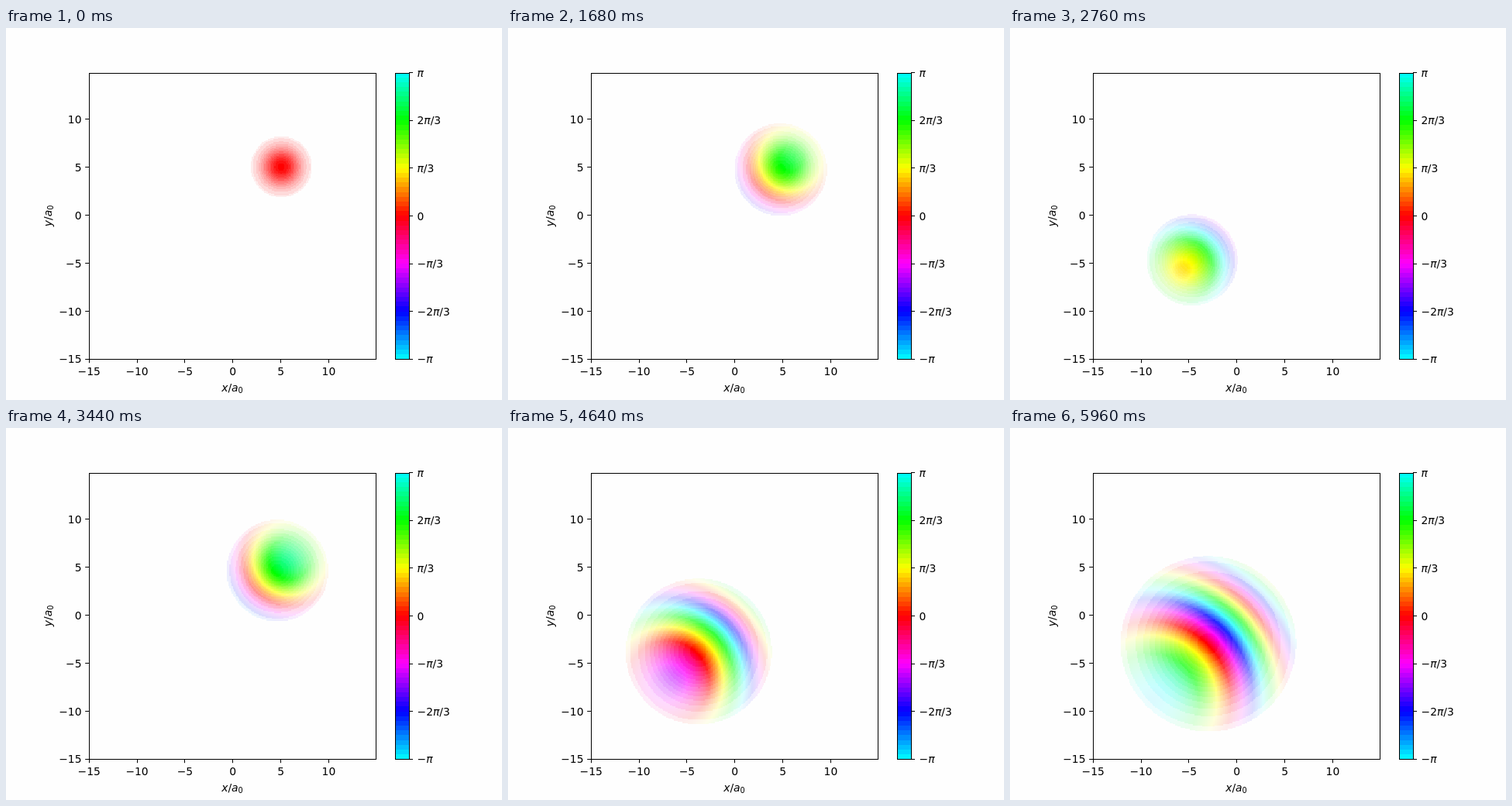
An HTML page with a canvas that plays this animation: 640x480 px, repeating every 6000 ms.

```html
<!DOCTYPE html>
<html lang="en">
<head>
<meta charset="utf-8">
<title>Wave packet in a harmonic trap</title>
<style>
  html, body { margin: 0; width: 100%; height: 100%; overflow: hidden; background: #fefefe; }
  canvas { display: block; }
</style>
</head>
<body>
<canvas id="stage" width="640" height="480"></canvas>
<script>
const ctx = document.getElementById('stage').getContext('2d');

// Plot geometry
const LEFT = 107.2, TOP = 57.6, SIZE = 369.6, BOTTOM = TOP + SIZE;
const BAR = { x: 502, w: 18, steps: 60 };
const CELLS = 255, DX = 30 / 256, SCALE = SIZE / (CELLS * DX);
const FONT = 13.89, FAMILY = '"DejaVu Sans", sans-serif';

// Physics: potential r²/100, a Gaussian exp(-r²/4) released at rest from (5, 5)
const OMEGA = Math.sqrt(0.02), START = 5, SQUEEZE = 0.5 / OMEGA;
const FRAME_MS = 40, FRAMES = 150;
const CUTOFF = 0.08, SHADES = 14;

const map = document.createElement('canvas');
map.width = map.height = CELLS;
const mapCtx = map.getContext('2d');
const pixels = mapCtx.createImageData(CELLS, CELLS);
const logAmp = new Float64Array(CELLS), phase = new Float64Array(CELLS);

function channel(turns, shift) {
  const h = (((turns * 6 + shift) % 6) + 6) % 6;
  return 255 * Math.min(1, Math.max(0, Math.abs(h - 3) - 1));
}
const hue = turns => [channel(turns, 0), channel(turns, 4), channel(turns, 2)];
const PALETTE = Array.from({ length: 360 }, (_, i) => hue(i / 360));

// The state is a product of equal factors in x and y
function solveAxis(t) {
  const c = Math.cos(OMEGA * t), s = Math.sin(OMEGA * t);
  const spread = c * c + SQUEEZE * SQUEEZE * s * s;
  const real = OMEGA * SQUEEZE / spread;
  const imag = OMEGA * (1 - SQUEEZE * SQUEEZE) * s * c / spread;
  const centre = START * c, momentum = -START * OMEGA * s;
  const offset = (momentum * centre - Math.atan2(SQUEEZE * s, c)) / 2;
  for (let i = 0; i < CELLS; i++) {
    const u = -15 + i * DX - centre;
    logAmp[i] = -real * u * u / 2;
    phase[i] = momentum * u - imag * u * u / 2 + offset;
  }
}

function paintMap(t) {
  solveAxis(t);
  const data = pixels.data;
  for (let j = 0, k = 0; j < CELLS; j++) {
    const row = CELLS - 1 - j;
    for (let i = 0; i < CELLS; i++, k += 4) {
      const amp = Math.exp(logAmp[i] + logAmp[row]);
      if (amp < CUTOFF) {
        data[k + 3] = 0;
        continue;
      }
      const turns = (phase[i] + phase[row]) / (2 * Math.PI);
      const rgb = PALETTE[Math.floor((turns - Math.floor(turns)) * 360) % 360];
      data[k] = rgb[0];
      data[k + 1] = rgb[1];
      data[k + 2] = rgb[2];
      data[k + 3] = 255 * Math.round(amp * SHADES) / SHADES;
    }
  }
  mapCtx.putImageData(pixels, 0, 0);
}

// Letters are oblique, "_" makes the next character a subscript
function label(text, x, y, align = 0) {
  const run = draw => {
    let pen = 0, sub = false;
    for (const ch of text) {
      if (ch === '_') { sub = true; continue; }
      const style = /[a-zπ]/.test(ch) ? 'italic ' : '';
      ctx.font = `${style}${sub ? FONT * 0.7 : FONT}px ${FAMILY}`;
      if (draw) ctx.fillText(ch, x - align * width + pen, y + (sub ? 2.2 : 0));
      pen += ctx.measureText(ch).width;
      sub = false;
    }
    return pen;
  };
  const width = run(false);
  run(true);
}

const snap = v => Math.floor(v) + 0.5;

function line(x1, y1, x2, y2) {
  ctx.beginPath();
  ctx.moveTo(x1, y1);
  ctx.lineTo(x2, y2);
  ctx.stroke();
}

function drawAxes() {
  for (let v = -15; v <= 10; v += 5) {
    const text = String(v).replace('-', '−');
    const x = LEFT + (v + 15) * SCALE, y = BOTTOM - (v + 15) * SCALE;
    line(snap(x), BOTTOM, snap(x), BOTTOM + 5);
    line(LEFT - 5, snap(y), LEFT, snap(y));
    label(text, x, 448, 0.5);
    label(text, LEFT - 9.7, y + 5.2, 1);
  }
  ctx.strokeRect(107.5, 58.5, 370, 369);
  label('x/a_0', LEFT + SIZE / 2, 468.5, 0.5);
  ctx.save();
  ctx.translate(58.5, TOP + SIZE / 2);
  ctx.rotate(-Math.PI / 2);
  label('y/a_0', 0, 0, 0.5);
  ctx.restore();
}

function drawBar() {
  const n = BAR.steps;
  const edge = i => Math.round(TOP + SIZE * i / n);
  for (let i = 0; i < n; i++) {
    ctx.fillStyle = `rgb(${hue(0.5 - (i + 0.5) / n)})`;
    ctx.fillRect(BAR.x, edge(i), BAR.w, edge(i + 1) - edge(i));
  }
  ctx.fillStyle = '#000';
  ctx.strokeRect(BAR.x + 0.5, 58.5, BAR.w, 369);
  ['π', '2π/3', 'π/3', '0', '−π/3', '−2π/3', '−π'].forEach((text, i) => {
    const y = TOP + SIZE * i / 6;
    line(BAR.x + BAR.w, snap(y), BAR.x + BAR.w + 5, snap(y));
    label(text, 530.5, y + 5.2);
  });
}

function draw(frame) {
  paintMap(frame);
  ctx.fillStyle = '#fefefe';
  ctx.fillRect(0, 0, 640, 480);
  ctx.imageSmoothingEnabled = false;
  ctx.drawImage(map, LEFT, TOP, SIZE, SIZE);
  ctx.fillStyle = ctx.strokeStyle = '#000';
  ctx.lineWidth = 1;
  drawAxes();
  drawBar();
}

const begin = performance.now();
let shown = -1;
function tick() {
  const frame = Math.floor((performance.now() - begin) / FRAME_MS) % FRAMES;
  if (frame !== shown) draw(shown = frame);
  requestAnimationFrame(tick);
}
tick();
</script>
</body>
</html>
```
